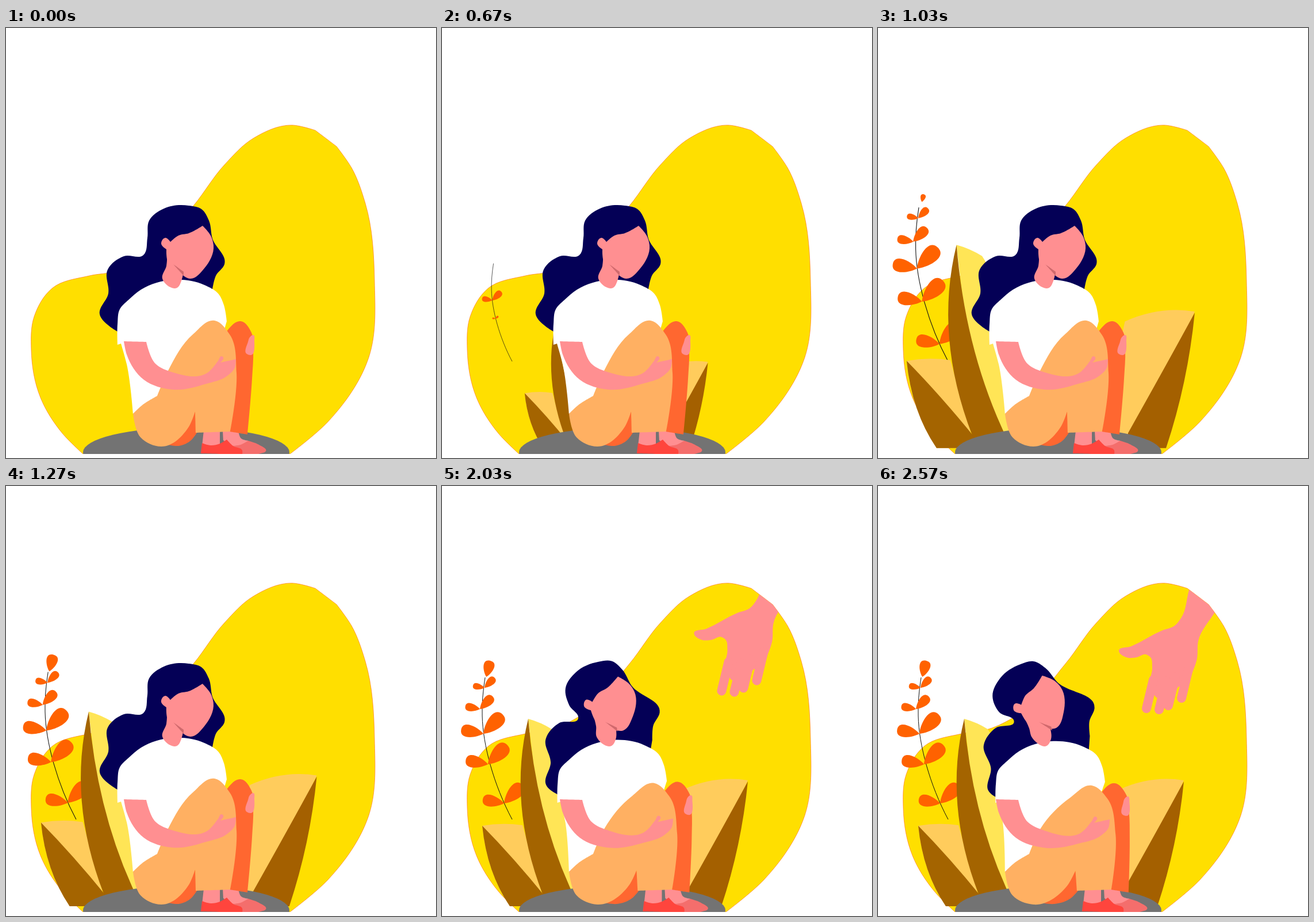
An HTML page with a canvas that plays this animation: 748 by 748 pixels, repeating every 3330 ms.

```html
<!DOCTYPE html>
<html lang="en">
<head>
<meta charset="utf-8">
<title>Reaching out</title>
<style>
  html, body { margin: 0; width: 100%; height: 100%; overflow: hidden; background: #fff; }
  canvas { display: block; width: 748px; height: 748px; }
</style>
</head>
<body>
<canvas id="stage" width="748" height="748"></canvas>
<script>
const ctx = document.getElementById('stage').getContext('2d');
const LOOP = 3330;
const SKIN = '#ff8f91', HAIR = '#040056', PANTS = '#ffb062', PANTS_DARK = '#ff6730';
const BROWN = '#a46400', PALE = '#ffcc5c', ORANGE = '#ff6200';

const ramp = (v, from, to) => Math.min(1, Math.max(0, (v - from) / (to - from)));
const ease = (t, from, to) => (1 - Math.cos(Math.PI * ramp(t, from, to))) / 2;
const fill = (path, color) => { ctx.fillStyle = color; ctx.fill(path); };

function scaled(cx, cy, s, draw) {
  ctx.save();
  ctx.translate(cx, cy);
  ctx.scale(s, s);
  ctx.translate(-cx, -cy);
  draw();
  ctx.restore();
}

// Closed splines through "x,y" key points; "!" marks a corner.
const points = text => text.trim().split(/\s+/).map(item => {
  const [x, y] = item.split(',').map(parseFloat);
  return { x, y, corner: item.endsWith('!') };
});

function outline(pts) {
  const n = pts.length, path = new Path2D();
  const tangent = i => {
    const a = pts[(i + n - 1) % n], b = pts[i], c = pts[(i + 1) % n];
    if (b.corner) return [0, 0];
    const before = (b.x - a.x) ** 2 + (b.y - a.y) ** 2, after = (c.x - b.x) ** 2 + (c.y - b.y) ** 2;
    const x = (b.x - a.x) * after + (c.x - b.x) * before;
    const y = (b.y - a.y) * after + (c.y - b.y) * before;
    const len = Math.hypot(x, y) || 1;
    return [x / len, y / len];
  };
  path.moveTo(pts[0].x, pts[0].y);
  pts.forEach((p, i) => {
    const j = (i + 1) % n, q = pts[j], d = Math.hypot(q.x - p.x, q.y - p.y) / 3;
    const [ux, uy] = tangent(i), [vx, vy] = tangent(j);
    path.bezierCurveTo(p.x + ux * d, p.y + uy * d, q.x - vx * d, q.y - vy * d, q.x, q.y);
  });
  path.closePath();
  return path;
}
const shape = text => outline(points(text));

// Backdrop
const blob = shape(`134,741! 98,705 60,643 44,560 49,502 80,453 145,431 192,423 240,400
  327,308 380,238 430,192 498,169 538,178! 575,206! 601,243 625,305 641,440 631,573 560,685 494,741!`);
const ground = new Path2D();
ground.ellipse(313.5, 738, 179.5, 43, 0, 0, 2 * Math.PI);

// Big leaves: a lit side with a shaded side over it
const blades = [
  [PALE, 'M70 591Q105 585 140 590L180 731H118Q78 672 70 591'],
  [BROWN, 'M70 591Q124 646 180 715V731H118Q78 672 70 591'],
  ['#ffe556', 'M150 405Q172 411 191 423Q225 470 240 715H185Z'],
  [BROWN, 'M150 405Q163 565 222 697L230 715 182 722 175 710Q114 552 150 405'],
  [PALE, 'M532 512Q475 503 420 528L380 710H440Z'],
  ['#a46000', 'M532 514Q483 604 425 707V731H486Q521 626 532 514']
].map(([color, d]) => [color, new Path2D(d)]);

// Sprig: pairs of teardrops along the stem, in order of appearance
const stem = new Path2D('M122 580C90 520 71 450 70 400Q69 370 75 333');
const pairs = [[72, 431, 73], [80, 484, 73], [66, 388, 48], [108, 552, 70], [74, 351, 38]];

function teardrop(x, y, dx, dy, fat = 1) {
  const at = (along, side) => [x + dx * along - dy * side * fat, y + dy * along + dx * side * fat];
  const path = new Path2D();
  path.moveTo(x, y);
  path.bezierCurveTo(...at(0.3, 0.25), ...at(1, 0.46), ...at(1, 0));
  path.bezierCurveTo(...at(1, -0.46), ...at(0.3, -0.25), x, y);
  return path;
}
const sprig = pairs.map(([x, y, size]) => ({
  x, y: y - size * 0.2,
  parts: [teardrop(x, y, -0.53 * size, -0.1 * size), teardrop(x, y, 0.46 * size, -0.46 * size)]
}));
sprig.push({ x: 82, y: 318, parts: [teardrop(77, 332, 7, -28, 1.2)] });

function drawPlants(t) {
  if (t < 170) return;
  const grow = 1.1 * ease(t, 60, 1110) - 0.1 * ease(t, 1110, 1390);
  scaled(122, 580, grow, () => {
    ctx.strokeStyle = '#111';
    ctx.lineWidth = 1;
    ctx.stroke(stem);
    sprig.forEach(({ x, y, parts }, i) => {
      const start = 555 + i * 80, size = ramp(t, start, start + 174);
      if (size > 0) scaled(x, y, size, () => parts.forEach(p => fill(p, ORANGE)));
    });
  });
  scaled(308, 734, grow, () => blades.forEach(([color, path]) => fill(path, color)));
}

// Reaching hand: palm outline plus four round-ended fingers
const palm = shape(`541,181 527,230 516,243 495,251 440,279 419,287 432,298 450,298 466,293 474,298
  477,315 473,350 484,368! 505,372! 522,350! 540,340! 555,300 557,270 587,218 720,20! 590,20!`);
const fingertips = points('467,387 489,389 505,382 528,369');

function drawHand(t) {
  const left = Math.pow(Math.max(0, 2580 - Math.max(t, 1200)) / 910, 2.8);
  ctx.save();
  ctx.clip(blob);
  ctx.translate(left * 80, -left * 126);
  fill(palm, SKIN);
  ctx.strokeStyle = SKIN;
  ctx.lineWidth = 16;
  ctx.lineCap = 'round';
  ctx.beginPath();
  for (const { x, y } of fingertips) {
    ctx.moveTo(x, y);
    ctx.lineTo(x + 12, y - 50);
  }
  ctx.stroke();
  ctx.restore();
}

// Woman: one pose, bent by a few rules as she lifts her head (k from 0 to 1)
const TURN = -28 * Math.PI / 180;

function turn(p, angle, dx = 0) {
  const c = Math.cos(angle), s = Math.sin(angle), x = p.x - 285, y = p.y - 450;
  return { ...p, x: 285 + x * c - y * s + dx, y: 450 + x * s + y * c };
}
const rules = {
  head: (p, k) => turn(p, TURN * k),
  hair: (p, k) => {
    const loose = ramp(p.y, 365, 395);
    return turn(p, TURN * k * (1 - 0.43 * loose), 11 * k * loose);
  },
  neck: (p, k) => {
    const stiff = ramp(p.y, 440, 414);
    return turn(p, TURN * k * stiff, -4 * k * (1 - stiff));
  },
  shade: (p, k) => turn(p, TURN * k * 0.55),
  shirt: (p, k) => ({
    ...p, x: p.x + 11 * k * ramp(p.y, 655, 545), y: p.y + 6 * k * ramp(p.y, 540, 500)
  })
};
// Limbs slide right from x = 280 on; the shift goes from knee height to the floor.
const lean = (kneeX, kneeY, floorX = 16) => (p, k) => {
  const side = k * ramp(p.x, 280, 330), low = ramp(p.y, 510, 700);
  return {
    ...p,
    x: p.x + side * (kneeX + (floorX - kneeX) * low),
    y: p.y + side * kneeY * (1 - low)
  };
};
const frontLean = lean(9, 12), backLean = lean(3, 7), armLean = lean(3, 6, 3);

const body = [
  [HAIR, rules.hair, `318,309 340,315 353,335 359,366 380,411 365,431 359,455! 350,480! 230,520!
    194,528! 163,498 178,462 177,420 205,397 239,395 246,365 249,335 275,314`],
  ['#fff', rules.shirt, `290,438 235,455 213,473 198,489 194,515 194,551! 200,549! 210,585 221,671!
    270,650! 370,560! 384,510! 379,482 370,463 345,447`],
  [SKIN, rules.neck, '280,380! 279,414 272,436 299,451 305,440 309,425 320,400!'],
  [SKIN, rules.head, `342,344! 356,361 361,378 345,418 321,436 300,424 282,408 279,385!
    270,375 277,365 286,372! 300,361 318,357`],
  ['#d0696d', rules.shade, '291,411! 309,424! 309,431!'],
  [PANTS_DARK, frontLean, '329,667! 332,704! 322,717 300,727 282,725!'],
  [SKIN, frontLean, '344,700! 372,700! 372,726! 341,728!'],
  [SKIN, frontLean, '377,700! 404,700! 409,714 422,718! 412,730! 392,730! 378,717!'],
  ['#f46e6c', frontLean, '392,727! 408,725 421,718! 440,725 452,736 443,740 408,741!'],
  ['#ff453d', frontLean, '341,722! 356,726 372,723 384,716! 395,727 411,735 411,742! 339,740!'],
  [PANTS_DARK, backLean, '386,525 408,510 427,530 430,560 428,610 420,707! 389,702! 400,600'],
  [SKIN, backLean, '424,538 430,534 432,545 425,569 419,567 421,546'],
  [PANTS, frontLean, `363,509 389,533 401,600 390,702! 330,704! 329,667! 319,692
    270,728 234,712 221,671! 237,656 263,640! 282,596 325,533`],
  [SKIN, armLean, `205,545! 244,546! 260,584 290,599 350,600 369,579 375,571 378,573 373,582!
    400,576! 398,591 385,605 348,619 290,629 240,612 210,568`]
].map(([color, rule, text]) => ({ color, rule, pts: points(text) }));

function drawWoman(t) {
  const k = ease(t, 1216, 2580);
  for (const { color, rule, pts } of body) fill(outline(pts.map(p => rule(p, k))), color);
}

function drawScene(t) {
  ctx.fillStyle = '#fff';
  ctx.fillRect(0, 0, 748, 748);
  ctx.save();
  ctx.beginPath();
  ctx.rect(0, 0, 748, 741);
  ctx.clip();
  fill(blob, '#ffdf00');
  ctx.strokeStyle = '#ff7a20';
  ctx.lineWidth = 0.7;
  ctx.stroke(blob);
  drawHand(t);
  drawPlants(t);
  fill(ground, '#737373');
  drawWoman(t);
  ctx.restore();
}

const origin = performance.now();
function tick() {
  drawScene((performance.now() - origin) % LOOP);
  requestAnimationFrame(tick);
}
tick();
</script>
</body>
</html>
```
